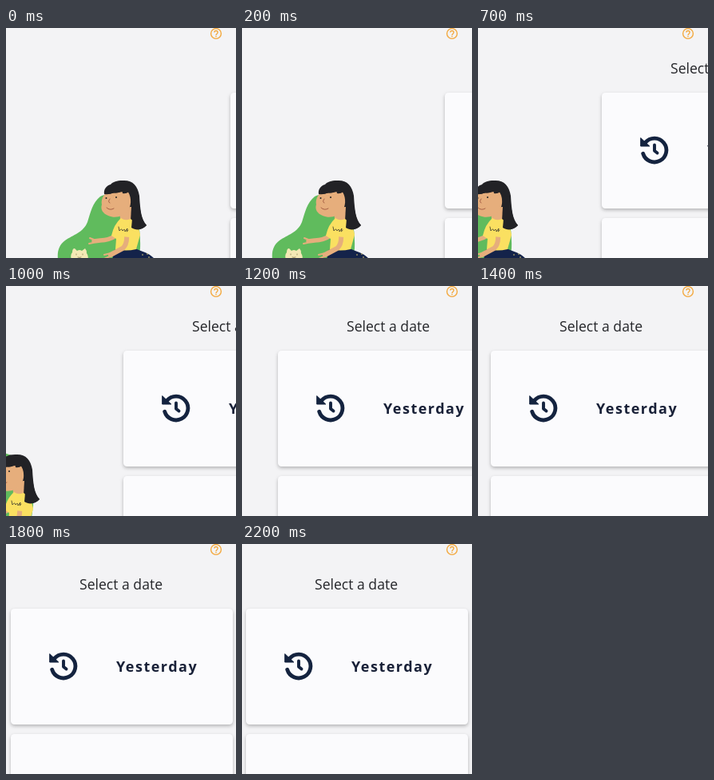
Animation, 288 px wide and 288 px high, one loop 3100 ms. Source, as an HTML page:

```html
<!DOCTYPE html>
<html lang="en">
<head>
<meta charset="utf-8">
<title>Select a date</title>
<style>
  html, body { margin: 0; width: 100%; height: 100%; overflow: hidden; background: #f3f3f5; }
  svg { display: block; width: 100%; height: 100%; }
  text { font-family: "Open Sans", "Noto Sans", sans-serif; }
  .card { fill: #fbfbfd; filter: drop-shadow(0 2px 2px rgba(0, 0, 0, .26)); }
  .title { font-size: 17.6px; fill: #25262a; }
  .day { font-size: 18px; font-weight: 700; letter-spacing: 1.5px; fill: #192138; }
  .line { fill: none; stroke-linecap: round; stroke-linejoin: round; }
  .skin { fill: #e6ae7c; }
  .arm { stroke: #e6ae7c; }
  .hair { fill: #222226; }
  .shirt { fill: #fae061; }
</style>
</head>
<body>
<svg viewBox="0 0 288 288">
  <rect width="288" height="288" fill="#f3f3f5"/>

  <g id="scene">
    <path fill="#60bb5d" d="M65 290C64 280 66 272 74 266C84 259 97 256 102 243C106 231 108 219 118 211C128 205 140 212 150 216C164 222 169 250 168 276L166 290Z"/>
    <g id="girl">
      <path fill="#14234a" d="M135 278Q150 275 164 277C170 280 178 281 185 288L190 312H130Z"/>
      <g fill="#e6d477">
        <circle cx="171" cy="284" r=".8"/><circle cx="177" cy="283" r=".8"/>
        <circle cx="179" cy="287" r=".8"/>
      </g>
      <path class="hair" d="M123 208C122 202 126 197 131 196C134 192 141 190.500 148 191C159 191 165 198 167 210C168 227 169 239 176 247C171 253 163 253 156 250L150 238L128 210Z"/>
      <path class="skin" d="M142 225L157 224L156 241Q149 247 143 240Z"/>
      <path class="skin" d="M124 208C132 207 146 206 151 203C157 209 158 221 153 228C147 236 137 239 128 235C121 232 118 227 120 221C119 216 121 211 124 208Z"/>
      <path class="hair" d="M123 208C127 198 141 194 155 199L161 210Q156 210 154 205Q150 208 146 207L145 203Q141 208 135 206Q130 209 123 208Z"/>
      <circle cx="125.500" cy="213" r="1" fill="#222"/>
      <circle cx="138" cy="212" r="1" fill="#222"/>
      <path class="line" stroke="#9f563f" stroke-width=".9" d="M130 214Q127 218 130 219M126 225Q130 229 135 226"/>
      <path class="line arm" stroke-width="5.500" d="M139 259Q129 266 118 266L110 267"/>
      <path class="line arm" stroke-width="2" d="M110 265L105 263M109 269L104 270"/>
      <path class="shirt" d="M144 238Q149 242 156 239C162 243 167 251 168 259L163 277Q150 280 137 277L138 264L132 260Q135 246 144 238Z"/>
      <path class="line arm" stroke-width="6" d="M151 259Q152 271 146 276L131 284"/>
      <path class="line arm" stroke-width="2" d="M131 282L123 284M130 286L123 289"/>
      <path class="shirt" d="M144 249Q155 244 158 256L155 262L145 261Z"/>
      <path class="line" stroke="#38372d" stroke-width=".8" d="M141 249L142 254Q145 250 146 254Q149 250 149 255L152 251Q150 258 153 253"/>
      <path class="hair" d="M156 212C159 230 158 242 157 250C163 254 171 253 176 247C169 241 168 228 166 211Z"/>
    </g>
    <path fill="#f4e9b5" d="M82 290Q80 284 83 281Q83 276 86 276L89 279Q92 277 95 279L99 276Q101 278 101 282Q104 286 102 290Z"/>
    <path class="line" stroke="#8a7b50" stroke-width=".8" d="M88 283V284M96 283V284M90 287Q92 288 94 287"/>
  </g>

  <g id="page">
    <text class="title" x="86" y="57">Select a date</text>
    <rect class="card" y="81" width="278" height="145" rx="4.500"/>
    <rect class="card" y="238" width="278" height="145" rx="4.500"/>
    <g transform="translate(66 153)">
      <path class="line" stroke="#14233f" stroke-width="4.800" d="M-14.300 4.200A14.900 14.900 0 1 0 -11.400 -9.600"/>
      <path fill="#14233f" stroke="#14233f" stroke-linejoin="round" d="M-17.300 -15.400V-5H-6.200Z"/>
      <path class="line" stroke="#14233f" stroke-width="3.900" d="M0 -6.500V.7L3.500 3.500"/>
    </g>
    <text class="day" x="132" y="160">Yesterday</text>
  </g>

  <g transform="translate(263 7)" fill="none" stroke="#f3a93f" stroke-width="1.400">
    <circle r="6.400"/>
    <path d="M-2.100 -1.400A2.100 2.100 0 1 1 2.100 -1.400C2.100 .2 0 .2 0 2.100M0 2.800V4.200"/>
  </g>
</svg>
<script>
  const LOOP = 3100, STEP = 100, LAST_CHANGE = 2200;
  const START_X = 281, REST_X = 5, PAUSE_X = 147, RELEASE = 1000;
  const scene = document.getElementById("scene");
  const girl = document.getElementById("girl");
  const page = document.getElementById("page");

  // Drag positions as [time, x], until the finger lets go.
  const drag = [[0, START_X], [100, 275], [200, 254], [300, 224], [400, 195],
                [500, 175], [600, 162], [700, 155], [850, 149], [RELEASE, PAUSE_X]];

  function along(keys, t) {
    const i = Math.max(1, keys.findIndex(key => key[0] >= t));
    const [t0, x0] = keys[i - 1], [t1, x1] = keys[i];
    return x0 + (x1 - x0) * (t - t0) / (t1 - t0);
  }

  function pageX(t) {
    if (t <= RELEASE) return along(drag, t);
    return REST_X + (PAUSE_X - REST_X) * Math.exp((RELEASE - t) / 158);
  }

  function sink(t) {
    const p = Math.min(1, Math.max(0, (t - 700) / 300));
    return 20 * p * p * (3 - 2 * p);
  }

  function draw(time) {
    const t = Math.min(LAST_CHANGE, Math.floor(time % LOOP / STEP) * STEP);
    const x = Math.round(pageX(t));
    page.setAttribute("transform", `translate(${x} 0)`);
    scene.setAttribute("transform", `translate(${x - START_X} 0)`);
    girl.setAttribute("transform", `translate(0 ${sink(t)})`);
  }

  const start = performance.now();
  function tick() {
    draw(performance.now() - start);
    requestAnimationFrame(tick);
  }
  tick();
</script>
</body>
</html>
```
